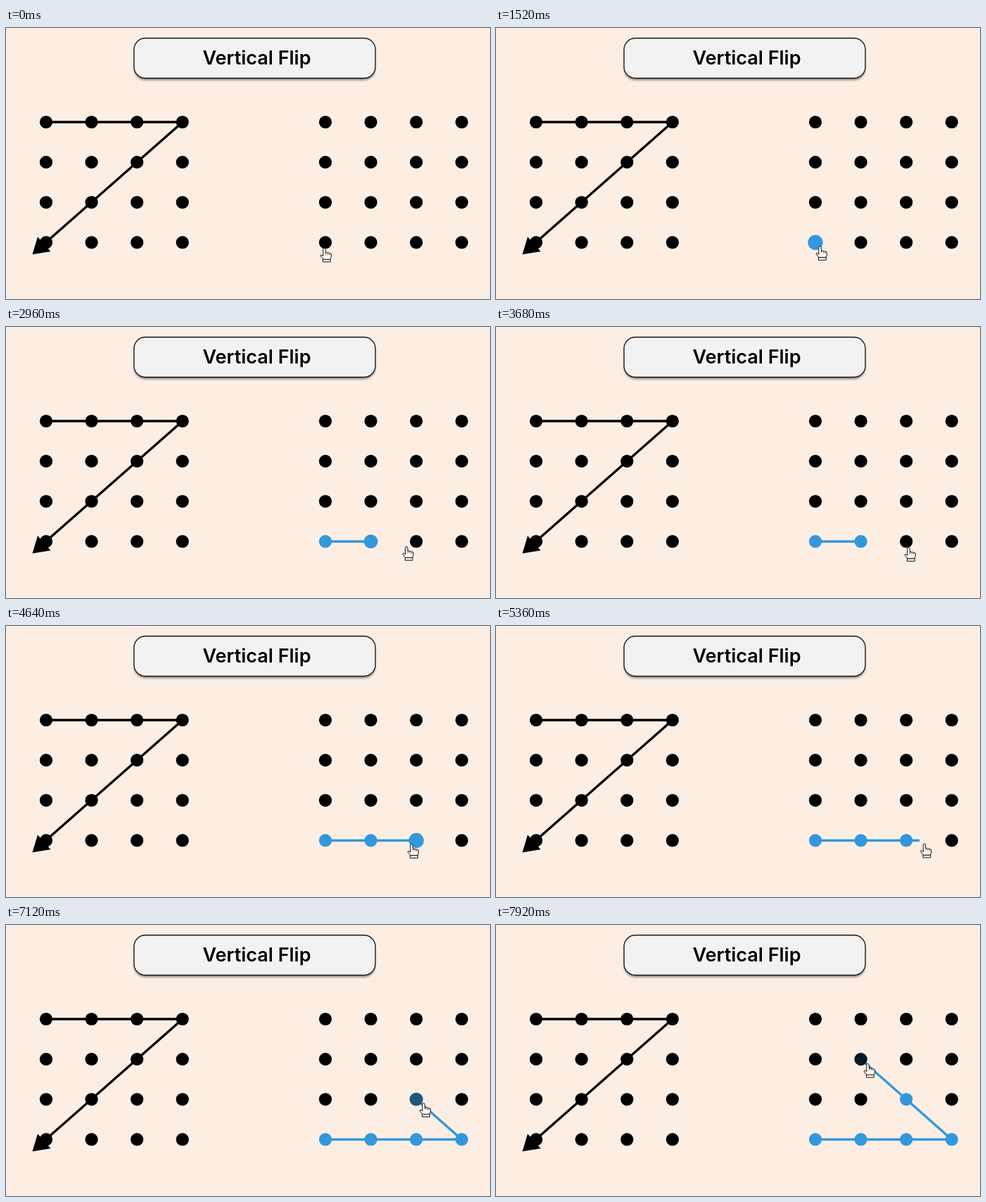
Recreate the animation shown at these times as an HTML page with a canvas. Size 688 px wide and 386 px high, loop 8000 ms.

```html
<!DOCTYPE html>
<html lang="en">
<head>
<meta charset="utf-8">
<title>Vertical Flip</title>
<style>
  html, body { margin: 0; width: 100%; height: 100%; overflow: hidden; background: #fdeee4; }
  canvas { display: block; width: 688px; height: 386px; }
</style>
</head>
<body>
<canvas id="stage"></canvas>
<script>
const LOOP = 8000;
const W = 688, H = 386;
const BLACK = [0, 0, 0], BLUE = [51, 151, 219];
const DOT_R = 9.1, BIG_R = 10.7;

const canvas = document.getElementById('stage');
const ratio = window.devicePixelRatio || 1;
canvas.width = W * ratio;
canvas.height = H * ratio;
const ctx = canvas.getContext('2d');
ctx.scale(ratio, ratio);

// Fingertip: time, x, y
const cursorKeys = [
  [160, 452.5, 313.5], [400, 460.5, 311], [1520, 460.5, 311], [1920, 501, 310.5],
  [2240, 501, 310.5], [2320, 502.5, 310], [3120, 577, 313], [3400, 577, 313],
  [3680, 586.5, 314], [3960, 586.5, 314], [4160, 581, 313], [4300, 581, 313],
  [4640, 576.5, 311], [5120, 597, 311], [5920, 652.5, 308], [6240, 652.5, 308],
  [7080, 594, 254], [7920, 528.5, 197.5]
];

// Each visited dot: cell, growth span, colour span, shrink span
const visits = [
  { col: 0, row: 3, grow: [160, 400], tint: [640, 1120], shrink: [1520, 1920] },
  { col: 1, row: 3, grow: [2440, 2640], tint: [2440, 2720], shrink: [2800, 3120] },
  { col: 2, row: 3, grow: [4360, 4600], tint: [4320, 4600], shrink: [4720, 5100] },
  { col: 3, row: 3, grow: [5520, 5840], tint: [5480, 5840], shrink: [6260, 6640] },
  { col: 2, row: 2, grow: [7040, 7280], tint: [6960, 7240], shrink: [7360, 7680] },
  { col: 1, row: 1, grow: [7900, 8100], tint: [7860, 8260], shrink: [8300, 8600] }
];

// Time span in which each link between visited dots is drawn
const links = [[2320, 2680], [4300, 4600], [5160, 5720], [6260, 7040], [7120, 7880]];

const clamp = v => Math.max(0, Math.min(1, v));
const mix = (a, b, k) => a + (b - a) * k;
const span = (t, [from, to]) => clamp((t - from) / (to - from));
const smooth = k => k * k * (3 - 2 * k);
const gridPoint = (left, col, row) => [left + col * 64.6, 134 + row * 57.15];

function cursorAt(t) {
  const next = cursorKeys.findIndex(key => key[0] > t);
  if (next === 0) return cursorKeys[0].slice(1);
  if (next < 0) return cursorKeys[cursorKeys.length - 1].slice(1);
  const a = cursorKeys[next - 1], b = cursorKeys[next];
  const k = smooth(span(t, [a[0], b[0]]));
  return [mix(a[1], b[1], k), mix(a[2], b[2], k)];
}

function dot([x, y], r, color) {
  ctx.fillStyle = color;
  ctx.beginPath();
  ctx.arc(x, y, r, 0, Math.PI * 2);
  ctx.fill();
}

function polyline(points, color) {
  ctx.strokeStyle = color;
  ctx.lineWidth = 3.4;
  ctx.lineJoin = 'round';
  ctx.beginPath();
  points.forEach(p => ctx.lineTo(...p));
  ctx.stroke();
}

function drawTitle() {
  ctx.save();
  ctx.shadowColor = 'rgba(0, 0, 0, 0.4)';
  ctx.shadowBlur = 3 * ratio;
  ctx.shadowOffsetY = 3 * ratio;
  ctx.fillStyle = '#f2f2f2';
  ctx.beginPath();
  ctx.roundRect(182, 14.5, 343, 57, 16);
  ctx.fill();
  ctx.restore();
  ctx.strokeStyle = '#111';
  ctx.lineWidth = 1.3;
  ctx.stroke();
  ctx.fillStyle = '#000';
  ctx.font = '600 27px Inter, sans-serif';
  ctx.textAlign = 'center';
  ctx.textBaseline = 'alphabetic';
  ctx.fillText('Vertical Flip', 356.5, 52);
}

function drawExample() {
  polyline([[57, 134], [251, 134], [48, 313]], '#000');
  for (let i = 0; i < 16; i++) dot(gridPoint(57, i % 4, i >> 2), DOT_R, '#000');
  ctx.beginPath();
  ctx.moveTo(37.5, 322.5);
  ctx.lineTo(45, 297.5);
  ctx.lineTo(63.5, 318.3);
  ctx.fill();
}

function drawAnswer(t) {
  const points = visits.map(v => gridPoint(454, v.col, v.row));
  const path = [points[0]];
  links.forEach((link, i) => {
    const k = smooth(span(t, link));
    const [a, b] = [points[i], points[i + 1]];
    if (k > 0) path.push([mix(a[0], b[0], k), mix(a[1], b[1], k)]);
  });
  if (path.length > 1) polyline(path, `rgb(${BLUE})`);

  for (let i = 0; i < 16; i++) {
    const col = i % 4, row = i >> 2;
    const v = visits.find(v => v.col === col && v.row === row);
    let r = DOT_R, color = BLACK;
    if (v) {
      const size = smooth(span(t, v.grow)) - smooth(span(t, v.shrink));
      r = mix(DOT_R, BIG_R, size);
      color = BLUE.map(c => Math.round(c * span(t, v.tint)));
    }
    dot(gridPoint(454, col, row), r, `rgb(${color})`);
  }
}

function drawHand([x, y]) {
  ctx.save();
  ctx.translate(x, y);
  ctx.fillStyle = '#fff6f0';
  ctx.strokeStyle = '#111';
  ctx.lineWidth = 1;
  ctx.lineJoin = 'round';
  ctx.beginPath();
  ctx.moveTo(-1.6, 11.5);
  ctx.lineTo(-1.8, 1.6);
  ctx.quadraticCurveTo(-1.6, 0, 0, 0);
  ctx.quadraticCurveTo(1.4, 0, 1.6, 1.6);
  ctx.lineTo(2, 6.6);
  ctx.quadraticCurveTo(3.5, 5.4, 4.8, 7);
  ctx.quadraticCurveTo(6.4, 6, 7.4, 7.6);
  ctx.quadraticCurveTo(9.8, 7, 10, 9.4);
  ctx.quadraticCurveTo(10.2, 13, 8.4, 16);
  ctx.lineTo(-1.4, 16);
  ctx.lineTo(-5.2, 11.4);
  ctx.quadraticCurveTo(-5.6, 9.2, -3.6, 9.6);
  ctx.closePath();
  ctx.fill();
  ctx.stroke();
  ctx.beginPath();
  ctx.rect(-2, 16, 10.8, 3.6);
  ctx.fill();
  ctx.stroke();
  ctx.lineWidth = 0.7;
  ctx.beginPath();
  for (const [fx, fy] of [[2, 6.6], [4.8, 7], [7.4, 7.6]]) {
    ctx.moveTo(fx, fy);
    ctx.lineTo(fx + 0.1, fy + 2.6);
  }
  ctx.stroke();
  ctx.restore();
}

function render(now) {
  const t = now % LOOP;
  ctx.fillStyle = '#fdeee4';
  ctx.fillRect(0, 0, W, H);
  drawTitle();
  drawExample();
  drawAnswer(t);
  drawHand(cursorAt(t));
}

let start;
function tick(now) {
  start ??= now;
  render(now - start);
  requestAnimationFrame(tick);
}
render(0);
requestAnimationFrame(tick);
</script>
</body>
</html>
```
